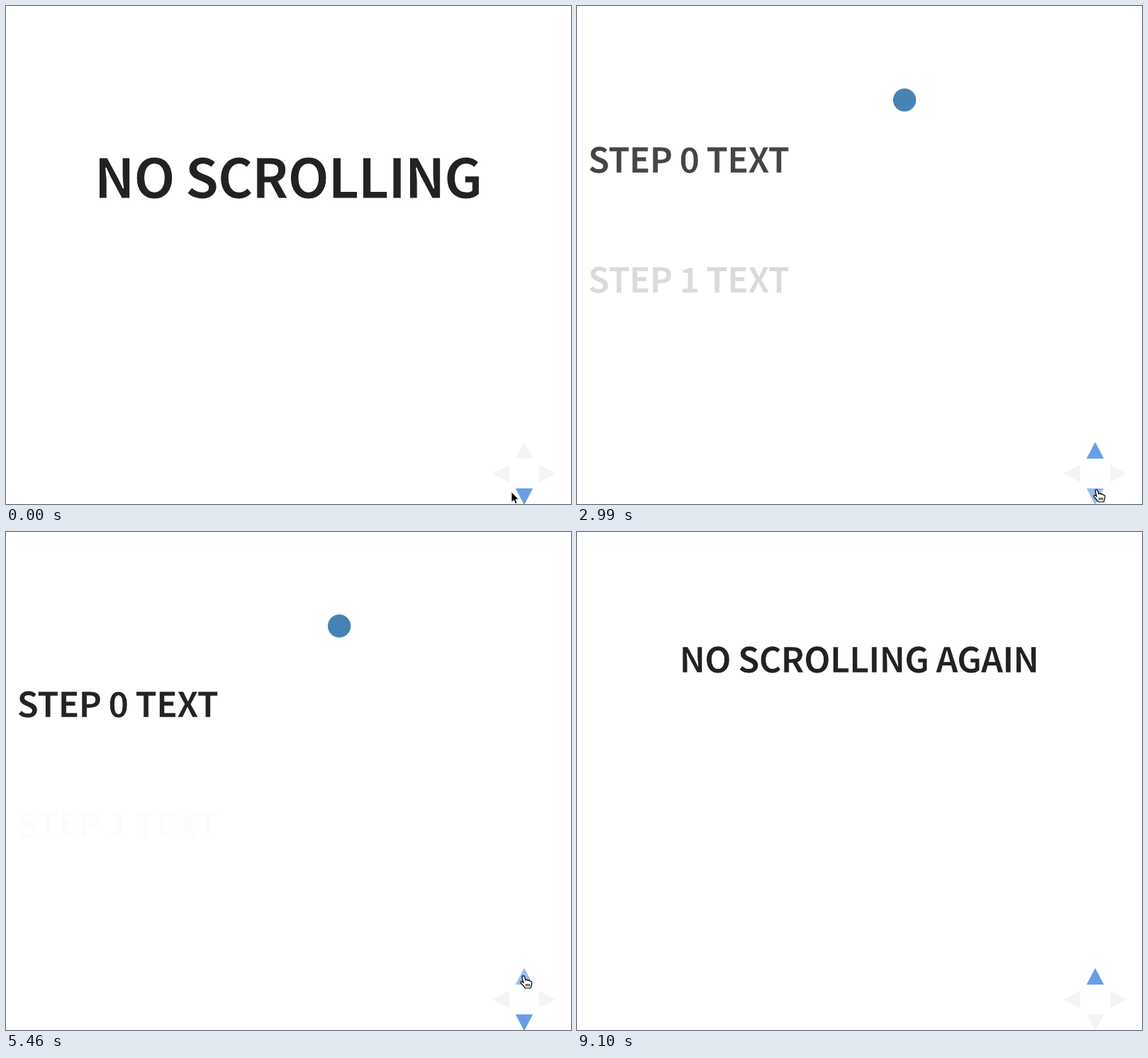
These frames come from a looping animation (797x702 px, 9.36 s). An HTML page:

```html
<!DOCTYPE html>
<html lang="en">
<head>
<meta charset="utf-8">
<title>Scrolling steps</title>
<style>
  html, body { margin: 0; width: 100%; height: 100%; overflow: hidden; background: #fff; }
  svg { display: block; width: 797px; height: 702px; }
  /* The thin white outline lightens bold to semibold */
  text { font: 700 49px 'Noto Sans CJK JP', 'Noto Sans CJK SC', 'Noto Sans CJK', 'Open Sans', sans-serif;
         letter-spacing: -.021em; fill: #222; stroke: #fff; stroke-width: .014em; }
  .big { font-size: 76.5px; letter-spacing: -.024em; }
  #dot { fill: steelblue; }
  .arrow { fill: #f2f4f5; stroke: #f2f4f5; stroke-linejoin: round; }
  .arrow.on { fill: #2a76dd; stroke: #2a76dd; opacity: .7; }
  .arrow.hover { fill: #6ca0e8; stroke: #6ca0e8; }
  #pointer { stroke: #fff; stroke-width: .8; }
  #hand { fill: #fff; stroke: #000; stroke-width: 1.2; stroke-linejoin: round; }
</style>
</head>
<body>
<svg viewBox="0 0 797 702">
  <text class="big">NO SCROLLING</text>
  <text>STEP 0 TEXT</text>
  <text>STEP 1 TEXT</text>
  <text>NO SCROLLING AGAIN</text>
  <circle id="dot" cy="132.5" r="16.2"/>
  <path class="arrow" d="M731 615.5L742.5 637.5H719.5Z"/>
  <path class="arrow" d="M719.5 680.5H742.5L731 702.5Z"/>
  <path class="arrow" d="M687.5 659L709.5 647.5V670.5Z"/>
  <path class="arrow" d="M774.5 659L752.5 647.5V670.5Z"/>
  <path id="pointer" d="M0 0V14.5L3.3 11.5L5.5 16.5L8 15.4L5.8 10.6H10.3Z"/>
  <path id="hand" d="M-2 2C-2.5-1 1-1 1.7 1.5L3 6C4 4.5 6 5 6.3 6.5C7.5 5.5 9 6 9.3 7.5C11 7 12 8 11.8 10L11 14L10 17H2.5L-.5 13.5L-4 9.5C-4.5 8-3 7-1.5 8L0 9.5ZM3.7 11V14.5M6 11V14.5M8.3 11V14.5"/>
</svg>
<script>
const LOOP = 9360, TICK = 130, SLIDE = 800, DOT_MOVE = 900, MIDDLE = 397.7;
const $ = s => document.querySelector(s);
const texts = [...document.querySelectorAll('text')];
const arrows = [...document.querySelectorAll('.arrow')];
const dot = $('#dot'), pointer = $('#pointer'), hand = $('#hand');

// Resting baseline and slide distance of each page
const pages = [
  { y: 270.5, shift: 223 },
  { y: 262, shift: 169, dotX: 462 },
  { y: 262, shift: 169, dotX: 622 },
  { y: 198, shift: 169 }
];
const visits = [
  { at: -SLIDE, page: 0 }, { at: 1480, page: 1 }, { at: 2950, page: 2 },
  { at: 4770, page: 1 }, { at: 6488, page: 2 }, { at: 7560, page: 3 }
];
// Time, x, y of the mouse
const mousePath = [
  [130, 713, 685], [910, 733, 688], [2080, 733, 688], [3000, 733, 682], [3900, 733, 682],
  [4550, 730, 626], [5600, 730, 626], [6240, 729, 693], [7150, 729, 693], [7560, 729, 688]
];
const MOUSE_GONE = 8840;

const clamp = v => Math.min(1, Math.max(0, v));
const mix = (a, b, p) => a + (b - a) * p;
const inOutCubic = p => p < .5 ? 4 * p ** 3 : 1 - 4 * (1 - p) ** 3;
const isStep = page => page === 1 || page === 2;

// cubic-bezier(.26, .86, .44, .985)
function slideEase(p) {
  const curve = (a, b, s) => 3 * (1 - s) ** 2 * s * a + 3 * (1 - s) * s * s * b + s ** 3;
  let lo = 0, hi = 1;
  for (let i = 0; i < 24; i++) {
    const s = (lo + hi) / 2;
    if (curve(.26, .44, s) < p) lo = s; else hi = s;
  }
  return p >= 1 ? 1 : curve(.86, .985, lo);
}

function mouseAt(t) {
  const i = mousePath.findIndex(k => k[0] > t);
  if (i === 0) return mousePath[0].slice(1);
  if (i < 0) return mousePath.at(-1).slice(1);
  const [t0, x0, y0] = mousePath[i - 1], [t1, x1, y1] = mousePath[i];
  const p = inOutCubic((t - t0) / (t1 - t0));
  return [mix(x0, x1, p), mix(y0, y1, p)];
}

function place(page, offset, alpha, left) {
  const el = texts[page];
  el.setAttribute('x', left ? 15.5 : MIDDLE);
  el.setAttribute('y', pages[page].y + offset * pages[page].shift);
  el.style.textAnchor = left ? 'start' : 'middle';
  el.style.opacity = alpha;
}

function drawMouse(t, page) {
  const [x, y] = mouseAt(t), shown = t < MOUSE_GONE;
  const over = Math.abs(x - 731) > 12 ? -1 : y > 614 && y < 639 ? 0 : y > 679 ? 1 : -1;
  const enabled = [page > 0, page < 3];
  arrows.forEach((el, i) => {
    el.classList.toggle('on', !!enabled[i]);
    el.classList.toggle('hover', shown && i === over && enabled[i]);
  });
  const linked = over >= 0 && enabled[over];
  pointer.style.display = shown && !linked ? '' : 'none';
  hand.style.display = shown && linked ? '' : 'none';
  for (const el of [pointer, hand]) el.setAttribute('transform', `translate(${x} ${y})`);
}

function draw(t) {
  const n = visits.findLastIndex(v => v.at <= t);
  const { at, page } = visits[n], from = n ? visits[n - 1].page : null;
  const e = slideEase(clamp((t - at) / SLIDE));
  const dir = from === null || page > from ? 1 : -1;

  texts.forEach(el => el.style.opacity = 0);
  if (from !== null) place(from, -dir * e, 1 - e, isStep(from) && isStep(page));
  place(page, dir * (1 - e), e, isStep(page));

  dot.style.display = isStep(page) ? '' : 'none';
  if (isStep(page)) {
    const p = inOutCubic(clamp((t - at) / DOT_MOVE));
    dot.setAttribute('cx', mix(pages[3 - page].dotX, pages[page].dotX, p));
  }
  drawMouse(t, page);
}

function loop() {
  draw(Math.floor(performance.now() % LOOP / TICK) * TICK);
  requestAnimationFrame(loop);
}
loop();
</script>
</body>
</html>
```
